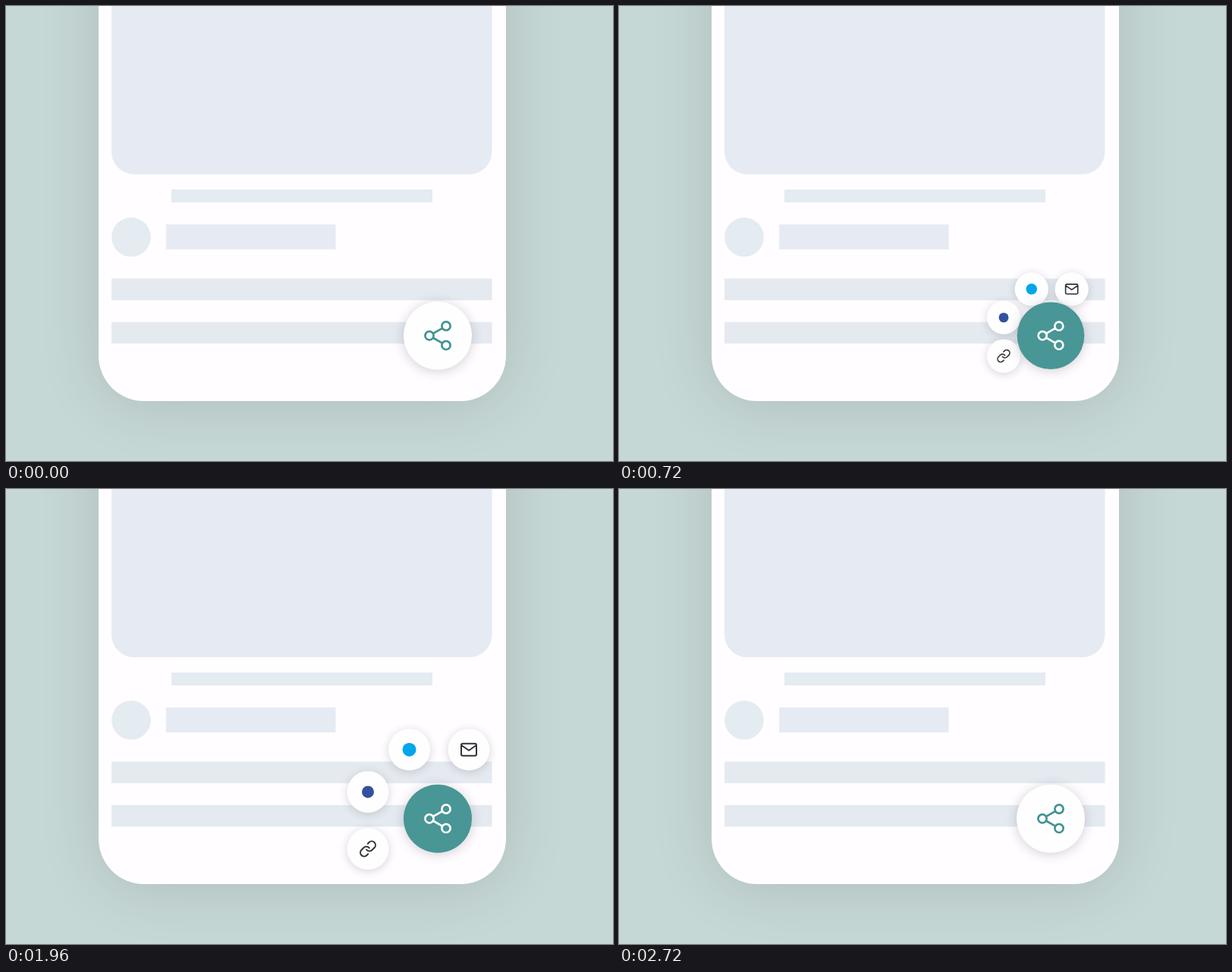
Animation of 800 by 600 pixels, one loop 3.56 s. Source, as an HTML page with a canvas:

```html
<!DOCTYPE html>
<html lang="en">
<head>
<meta charset="utf-8">
<title>Share button</title>
<style>
html, body { margin: 0; width: 100%; height: 100%; overflow: hidden; background: #c6d8d6; }
canvas { display: block; }
</style>
</head>
<body>
<canvas id="stage" width="800" height="600"></canvas>
<script>
const ctx = document.getElementById('stage').getContext('2d');
const LOOP = 3560, STEP = 40;
const WHITE = [255, 254, 255], TEAL = [72, 150, 149], INK = '#2f3339';
const CENTER = { x: 569, y: 434.7 };

const mailIcon = new Path2D('M4 4h16a2 2 0 0 1 2 2v12a2 2 0 0 1-2 2H4a2 2 0 0 1-2-2V6a2 2 0 0 1 2-2zM22 6l-10 7L2 6');
const linkIcon = new Path2D('M10 13a5 5 0 0 0 7.54.54l3-3a5 5 0 0 0-7.07-7.07l-1.72 1.71' +
  'M14 11a5 5 0 0 0-7.54-.54l-3 3a5 5 0 0 0 7.07 7.07l1.71-1.71');
const items = [
  { dx: 41, dy: -91, icon: mailIcon },
  { dx: -37.5, dy: -91, dot: '#00a6eb', size: 9 },
  { dx: -92, dy: -35.3, dot: '#33529c', size: 8 },
  { dx: -92, dy: 39.8, icon: linkIcon },
];

// Sine ease from 0 to 1, starting at `start` and lasting `length` ms.
function ease(t, start, length) {
  const p = Math.min(1, Math.max(0, (t - start) / length));
  return (1 - Math.cos(Math.PI * p)) / 2;
}

const mix = (a, b, p) => `rgb(${a.map((v, i) => Math.round(v + (b[i] - v) * p))})`;

function disc(x, y, r, color) {
  ctx.fillStyle = color;
  ctx.beginPath();
  ctx.arc(x, y, r, 0, 2 * Math.PI);
  ctx.fill();
}

function box(x, y, w, h, color, radius = 0) {
  ctx.fillStyle = color;
  ctx.beginPath();
  ctx.roundRect(x, y, w, h, radius);
  ctx.fill();
}

function withShadow(color, blur, offset, draw) {
  ctx.save();
  ctx.shadowColor = color;
  ctx.shadowBlur = blur;
  ctx.shadowOffsetY = offset;
  draw();
  ctx.restore();
}

function drawPage() {
  box(0, 0, 800, 600, '#c6d8d6');
  withShadow('rgba(0,0,0,.13)', 80, 4, () => box(122, -300, 537, 821, '#fffdff', 60));
  box(139, -60, 501.5, 282, '#e6ebf3', 30);
  box(218, 242, 344, 17, '#e4ebf1');
  disc(165, 304.8, 25.8, '#e4ebf1');
  box(211, 288, 223.5, 33, '#e6ebf3');
  box(139, 359.5, 501.5, 28.5, '#e5eaf1');
  box(139, 416.7, 501.5, 28.5, '#e5eaf1');
}

function drawItem({ dx, dy, icon, dot, size }, open) {
  ctx.save();
  ctx.translate(CENTER.x + dx * open, CENTER.y + dy * open);
  const scale = 0.4 + 0.6 * open;
  ctx.scale(scale, scale);
  withShadow('rgba(50,45,60,.2)', 12, 2, () => disc(0, 0, 27.5, mix(WHITE, WHITE, 0)));
  if (dot) {
    disc(0, 0, size, dot);
  } else {
    ctx.translate(-12, -12);
    ctx.strokeStyle = INK;
    ctx.lineWidth = 2;
    ctx.stroke(icon);
  }
  ctx.restore();
}

function drawButton(radius, teal) {
  ctx.save();
  ctx.translate(CENTER.x, CENTER.y);
  ctx.scale(radius / 45, radius / 45);
  withShadow('rgba(50,45,60,.22)', 15, 2, () => disc(0, 0, 45, mix(WHITE, TEAL, teal)));
  ctx.strokeStyle = mix([64, 148, 145], WHITE, teal);
  ctx.lineWidth = 2.7;
  ctx.beginPath();
  for (const [x, y] of [[-11, 0], [11, -12.7], [11, 12.7]]) {
    ctx.moveTo(x + 5.6, y);
    ctx.arc(x, y, 5.6, 0, 2 * Math.PI);
  }
  for (const side of [-1, 1]) {
    ctx.moveTo(-6.2, 2.8 * side);
    ctx.lineTo(6.2, 9.9 * side);
  }
  ctx.stroke();
  ctx.restore();
}

function frame(now) {
  const t = Math.floor((now % LOOP) / STEP) * STEP;
  const hovers = [166, 1983], clicks = [487, 2280];
  const [tealIn, tealOut] = hovers.map(start => ease(t, start, 340));
  const [opening, closing] = clicks.map(start => ease(t, start, 380));
  let radius = 45;
  for (const start of hovers) radius += 3 * ease(t, start, 180);
  for (const start of clicks) radius += ease(t, start + 285, 150) - 4 * ease(t, start, 285);

  drawPage();
  for (const item of items) drawItem(item, opening - closing);
  drawButton(radius, tealIn - tealOut);
  requestAnimationFrame(frame);
}

ctx.lineCap = ctx.lineJoin = 'round';
requestAnimationFrame(frame);
</script>
</body>
</html>
```
